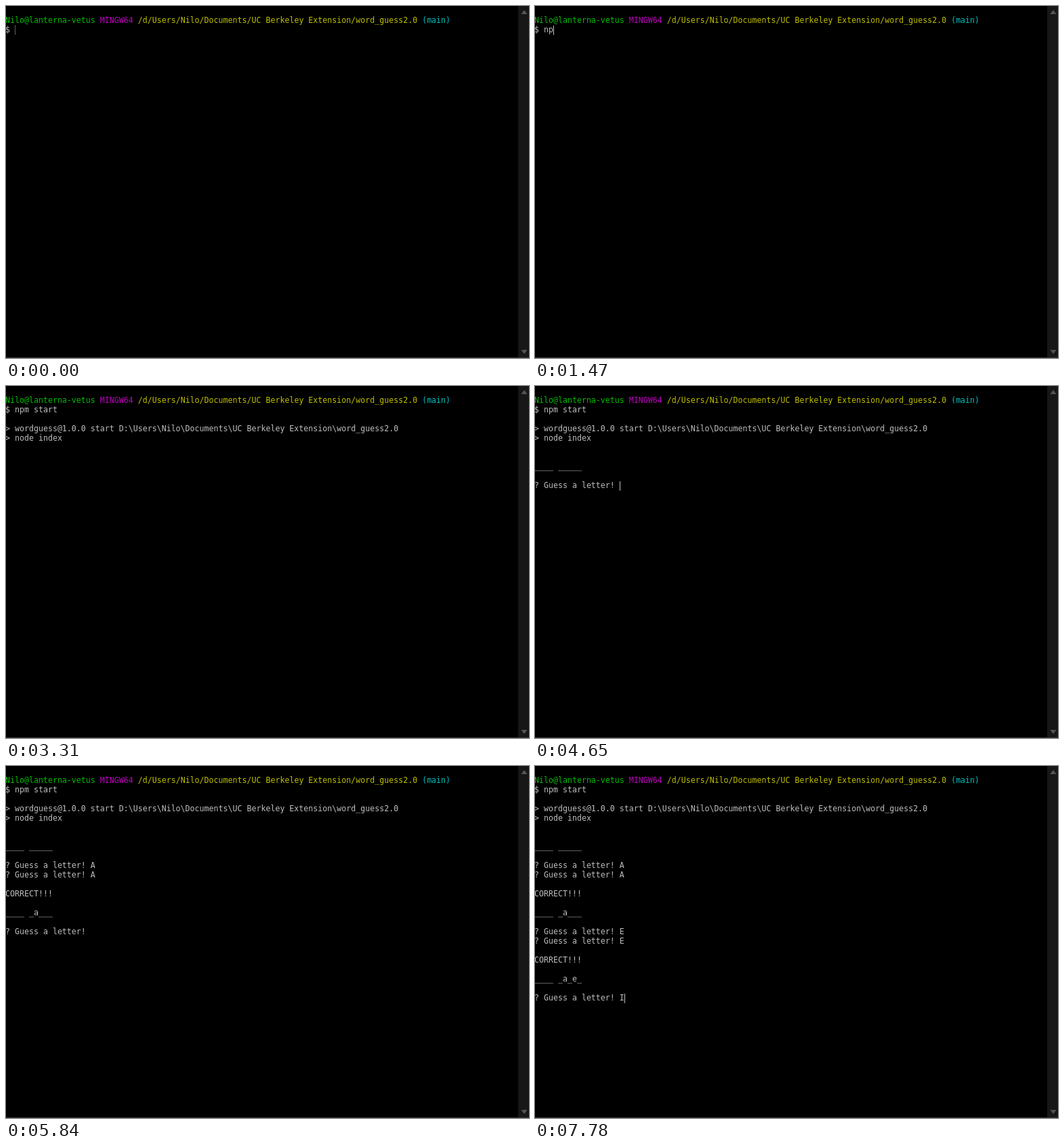
These frames come from a looping animation (772x521 px, 8 s). An HTML page:

```html
<!DOCTYPE html>
<html lang="en">
<head>
<meta charset="utf-8">
<title>Word guess terminal</title>
<style>
  html, body { margin: 0; width: 100%; height: 100%; overflow: hidden; background: #000; }
  #stage { position: relative; width: 772px; height: 521px; overflow: hidden; background: #000; }
  pre {
    position: absolute; left: -1px; top: 0; margin: 0; color: #bfbfbf;
    font: 11.627px/14px "DejaVu Sans Mono", monospace;
    font-variant-ligatures: none;
  }
  .user { color: #00bf00; }
  .shell { color: #bf00bf; }
  .path { color: #bfbf00; }
  .branch { color: #00bfbf; }
  #caret { position: absolute; width: 1px; height: 14px; background: #bfbfbf; }
  #caret.dotted { background: repeating-linear-gradient(#bfbfbf 0 1px, #000 1px 2px); }
  svg { position: absolute; left: 0; top: 0; }
</style>
</head>
<body>
<div id="stage">
  <pre>
&#8203;
<span class="user">Nilo@lanterna-vetus</span> <span class="shell">MINGW64</span> <span class="path">/d/Users/Nilo/Documents/UC Berkeley Extension/word_guess2.0</span> <span class="branch">(main)</span>
<span id="output"></span></pre>
  <div id="caret"></div>
  <svg width="772" height="521">
    <rect x="756" width="16" height="521" fill="#171717"/>
    <path d="M760.5 12l4.5-6 4.5 6zM760.5 509l4.5 6 4.5-6z" fill="#555"/>
    <rect y="520" width="772" height="1" fill="#3a3a3a"/>
  </svg>
</div>
<script>
const LOOP = 8000, CELL_W = 7, CELL_H = 14, FIRST_ROW = 2;
const ASK = "? Guess a letter! ";
const reply = word => `\n\nCORRECT!!!\n\n${word}\n\n${ASK}`;

// [time, text appended, caret visible]
const events = [
  [0, "$ ", true],
  [470, "", false],
  [930, "", true],
  [1200, "n", true],
  [1470, "p", true],
  [1520, "m", true],
  [1590, " ", true],
  ...[..."start"].map((key, i) => [1730 + i * 112.5, key, true]),
  [2450, "", false],
  [3310, "\n\n> wordguess@1.0.0 start D:\\Users\\Nilo\\Documents\\UC Berkeley Extension\\word_guess2.0\n> node index", false],
  [3660, "\n\n\n____ _____\n\n" + ASK, true],
  [4110, "", false],
  [4650, "", true],
  [5050, "A", true],
  [5310, `\n${ASK}A`, true],
  [5380, reply("____ _a___"), true],
  [5840, "", false],
  [6390, "", true],
  [6720, "E", true],
  [7050, `\n${ASK}E` + reply("____ _a_e_"), true],
  [7580, "", false],
  [7780, "I", true],
];

const output = document.getElementById("output");
const caret = document.getElementById("caret");

function render(time) {
  const past = events.filter(([start]) => start <= time);
  const text = past.map(([, added]) => added).join("");
  const lines = text.split("\n");
  if (output.textContent !== text) output.textContent = text;
  caret.style.left = lines.at(-1).length * CELL_W - 1 + "px";
  caret.style.top = (FIRST_ROW + lines.length - 1) * CELL_H + 1 + "px";
  caret.hidden = !past.at(-1)[2];
  caret.className = time < 190 ? "dotted" : "";
}

const startTime = performance.now();
function tick() {
  render((performance.now() - startTime) % LOOP);
  requestAnimationFrame(tick);
}
tick();
</script>
</body>
</html>
```
